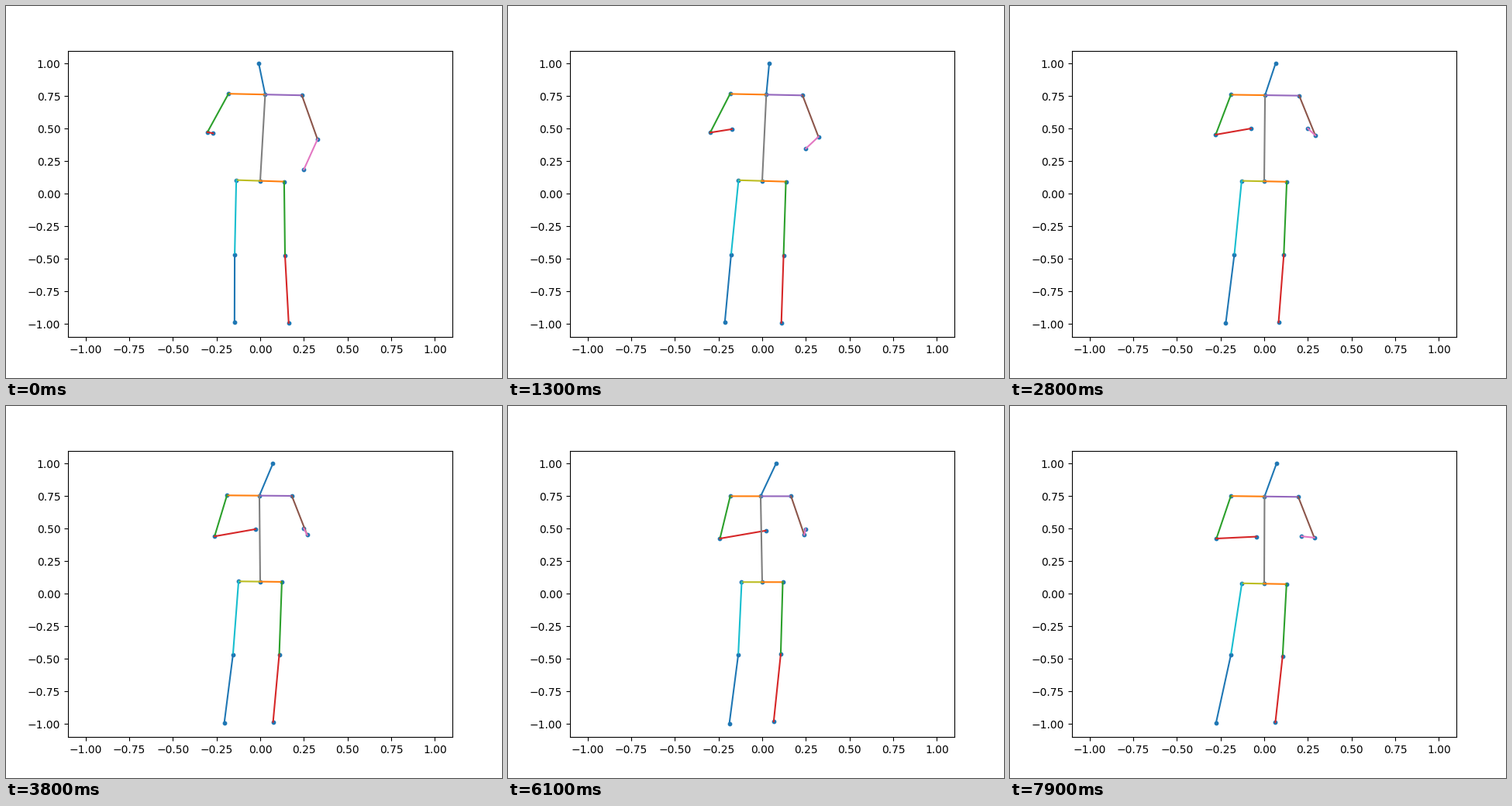
Recreate the animation shown at these times as a matplotlib script. Size 640x480 px, loop 8000 ms.

```python
import math
import matplotlib.pyplot as plt
from matplotlib.animation import FuncAnimation

FRAMES, INTERVAL = 80, 100
HOLDS = (30, 60)  # the pose stands still for one step here

# Drawn in this order, so the default colour cycle gives each bone its colour.
BONES = [("head", "neck"),
         ("neck", "l_shoulder"), ("l_shoulder", "l_elbow"), ("l_elbow", "l_wrist"),
         ("neck", "r_shoulder"), ("r_shoulder", "r_elbow"), ("r_elbow", "r_wrist"),
         ("neck", "pelvis"),
         ("pelvis", "l_hip"), ("l_hip", "l_knee"), ("l_knee", "l_foot"),
         ("pelvis", "r_hip"), ("r_hip", "r_knee"), ("r_knee", "r_foot")]


def ease(t, start, end):
    s = min(max((t - start) / (end - start), 0), 1)
    return s * s * (3 - 2 * s)


def pose(frame):
    """Joint positions, mixed from a few shared movements of the body."""
    t = (frame - (frame in HOLDS)) * INTERVAL / 1000

    settle = 1 - math.exp(-t / 1.7)       # weight shifts and comes to rest
    out = ease(t, 0.4, 6)                 # torso turns away from the viewer
    back = max(0, (t - 6) / 1.9)          # then swings back steadily
    turn = out - 0.54 * back
    lift = ease(t, -0.3, 2.8)             # right forearm comes up
    reach = math.sin(math.pi * t / 12.2)  # left forearm crosses the body

    neck_x = -0.009 + 0.0375 * (1 - turn) ** 2
    neck_y = 0.763 - 0.013 * out - 0.002 * back
    hip_y = 0.1 - 0.009 * out - 0.013 * back
    shoulder = 0.21 - 0.037 * turn        # half widths shrink with the turn
    hip = 0.137 - 0.02 * turn
    tilt = 0.006 * (1 - turn)

    return {
        "head": (-0.008 + 0.09 * settle - 0.011 * back, 1),
        "neck": (neck_x, neck_y),
        "pelvis": (0, hip_y),
        "l_shoulder": (neck_x - shoulder, neck_y + tilt),
        "r_shoulder": (neck_x + shoulder, neck_y - tilt),
        "l_hip": (-hip, hip_y + tilt),
        "r_hip": (hip, hip_y - tilt),
        "l_elbow": (-0.302 + 0.062 * turn, 0.474 - 0.049 * out),
        "r_elbow": (0.328 - 0.09 * turn, 0.419 + 0.037 * settle - 0.024 * back),
        "l_wrist": (-0.27 + 0.292 * reach - 0.037 * back,
                    0.465 + 0.065 * settle - 0.04 * out - 0.05 * back),
        "r_wrist": (0.25 - 0.036 * back, 0.179 + 0.323 * lift - 0.06 * back),
        "l_knee": (-0.146 - 0.07 * settle + 0.08 * out - 0.055 * back, -0.467),
        "r_knee": (0.142 - 0.037 * settle, -0.473 + 0.01 * out - 0.015 * back),
        "l_foot": (-0.147 - 0.138 * settle + 0.098 * out - 0.09 * back,
                   -0.987 - 0.008 * out + 0.004 * back),
        "r_foot": (0.163 - 0.1 * settle, -0.991 + 0.011 * out - 0.006 * back),
    }


fig, ax = plt.subplots(figsize=(6.4, 4.8), dpi=100)
ax.set_xlim(-1.1, 1.1)
ax.set_ylim(-1.1, 1.1)
dots = ax.scatter([], [], s=10, color="C0")
lines = [ax.plot([], [])[0] for _ in BONES]


def draw(frame):
    joints = pose(frame)
    dots.set_offsets(list(joints.values()))
    for line, (a, b) in zip(lines, BONES):
        line.set_data(*zip(joints[a], joints[b]))
    return [dots, *lines]


anim = FuncAnimation(fig, draw, frames=FRAMES, interval=INTERVAL,
                     repeat=True, repeat_delay=0)
plt.show()
```
